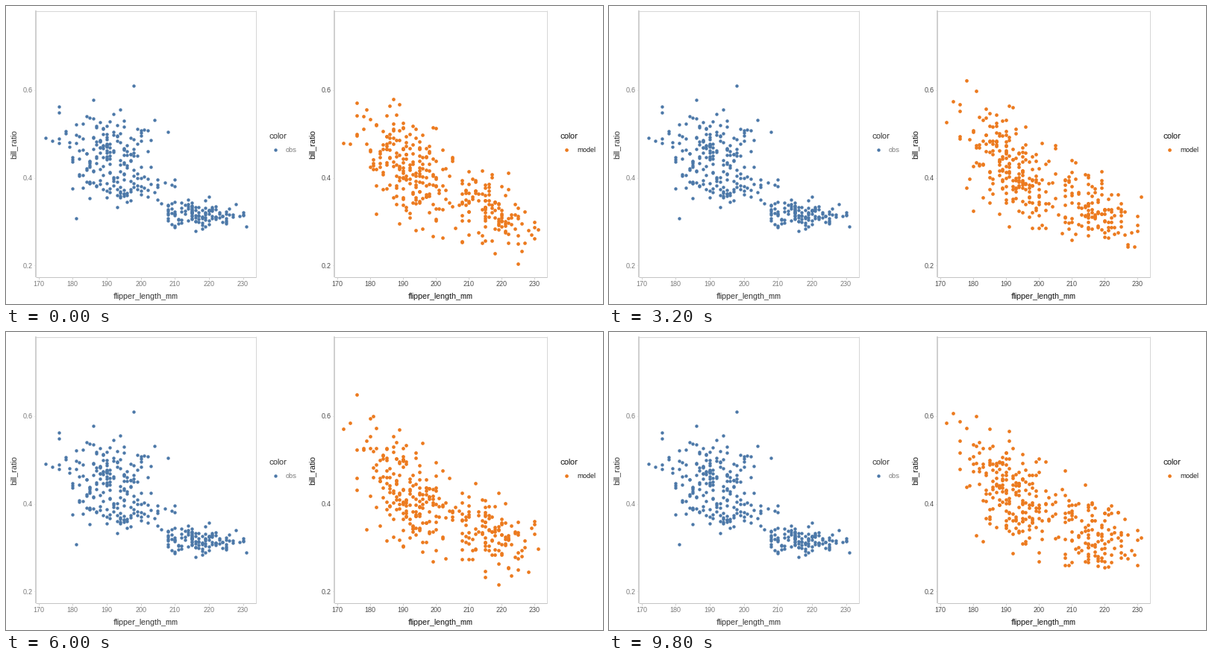
Write a matplotlib script that moves like this. It is 800 by 400 pixels and loops after 10 s.

```python
import numpy as np
import matplotlib.pyplot as plt
from matplotlib.animation import FuncAnimation

plt.rcParams["font.family"] = "Liberation Sans"
plt.rcParams["text.hinting"] = "default"
plt.rcParams["text.hinting_factor"] = 1

W, H, DPI = 800, 400, 100
FRAMES, STEP = 50, 200
BLUE, ORANGE = "#4c78a8", "#ec7a1e"
PX = 72 / DPI

# three groups of birds: count, flipper mean and spread, ratio mean and spread
GROUPS = [(146, 190, 6.6, 0.468, 0.041),
          (68, 196, 6.6, 0.379, 0.019),
          (119, 217, 6.0, 0.317, 0.015)]
KEY_POINTS = [(172, 0.491), (174, 0.484), (181, 0.307), (198, 0.61), (231, 0.289)]


def bell(n):
    """Evenly spread quantiles of a near-normal curve."""
    p = (np.arange(n) + 0.5) / n
    return 4.91 * (p ** 0.14 - (1 - p) ** 0.14)


def observe():
    rng = np.random.default_rng(4)
    lengths, ratios = [], []
    for n, mid, spread, ratio, noise in GROUPS:
        x = mid + spread * bell(n)
        rounded = rng.random(n) < 0.15
        x = np.where(rounded, 5 * np.round(x / 5), np.round(x))
        low = 208 if mid > 200 else 176
        lengths.append(np.clip(x, low, 230))
        ratios.append(ratio + noise * rng.permutation(bell(n)))
    key_x, key_ratio = zip(*KEY_POINTS)
    return np.concatenate(lengths + [key_x]), np.concatenate(ratios + [key_ratio])


LENGTHS, RATIOS = observe()


def simulate(i):
    rng = np.random.default_rng(700 + i)
    mean = 0.48 * np.exp(-0.0104 * (LENGTHS - 180))
    return mean * (1 + 0.13 * np.clip(rng.normal(size=LENGTHS.size), -2.5, 2.5))


def ratio_y(ratio):
    return 348 - (ratio - 0.2) * 587.5


fig = plt.figure(figsize=(W / DPI, H / DPI), dpi=DPI, facecolor="white")
ax = fig.add_axes([0, 0, 1, 1])
ax.set_xlim(0, W)
ax.set_ylim(H, 0)
ax.axis("off")


def line(xs, ys, color, width=1):
    ax.plot(xs, ys, color=color, lw=width * PX, solid_capstyle="butt", zorder=1)


def label(x, y, text, size, color, ha="left", va="baseline", rotation=0):
    ax.text(x, y, text, fontsize=size * PX, color=color, ha=ha, va=va,
            rotation=rotation)


def dot_cloud(x, y, color, size):
    return ax.scatter(x, y, s=(size * PX) ** 2, color=color, linewidths=0, zorder=3)


def panel(left, right, x0, scale, color, size, name, tick_ink, title_ink, name_ink):
    """Draw the frame, axes and legend; return the x places of the birds."""
    line([left, right], [6.7, 6.7], "#d6d6d6")
    line([right, right], [6, 364], "#d6d6d6")
    line([left, left], [6, 364], "#cfcfcf", 2)
    line([left, right], [364, 364], "#c4c4c4")
    for mm in range(170, 231, 10):
        x = x0 + (mm - 170) * scale
        line([x, x], [364, 366.5], "#d0d0d0")
        label(x, 376, str(mm), 9.3, tick_ink, "center")
    for ratio in (0.2, 0.4, 0.6):
        y = ratio_y(ratio)
        line([left - 2.5, left], [y, y], "#d0d0d0")
        label(left - 4.5, y + 3.5, f"{ratio:.1f}", 9.3, tick_ink, "right")
    label((left + right) / 2, 393, "flipper_length_mm", 11, title_ink, "center")
    label(left - 29.5, 185.5, "bill_ratio", 11, title_ink, "center", "center", 90)
    label(right + 17, 178, "color", 11, title_ink)
    label(right + 40, 196.3, name, 9, name_ink)
    dot_cloud([right + 26], [193], color, size)
    return x0 + (LENGTHS - 170) * scale


left_x = panel(40, 335, 43.6, 4.565, BLUE, 4.4, "obs", "#757575", "#333333", "#757575")
right_x = panel(440, 725, 443.5, 4.415, ORANGE, 4.7, "model", "#444444", "#111111",
                "#111111")
dot_cloud(left_x, ratio_y(RATIOS), BLUE, 4.4)
dots = dot_cloud(right_x, ratio_y(simulate(0)), ORANGE, 4.7)


def draw(i):
    dots.set_offsets(np.column_stack([right_x, ratio_y(simulate(i))]))
    return (dots,)


anim = FuncAnimation(fig, draw, frames=FRAMES, interval=STEP, repeat=True,
                     repeat_delay=0, blit=False)
plt.show()
```
